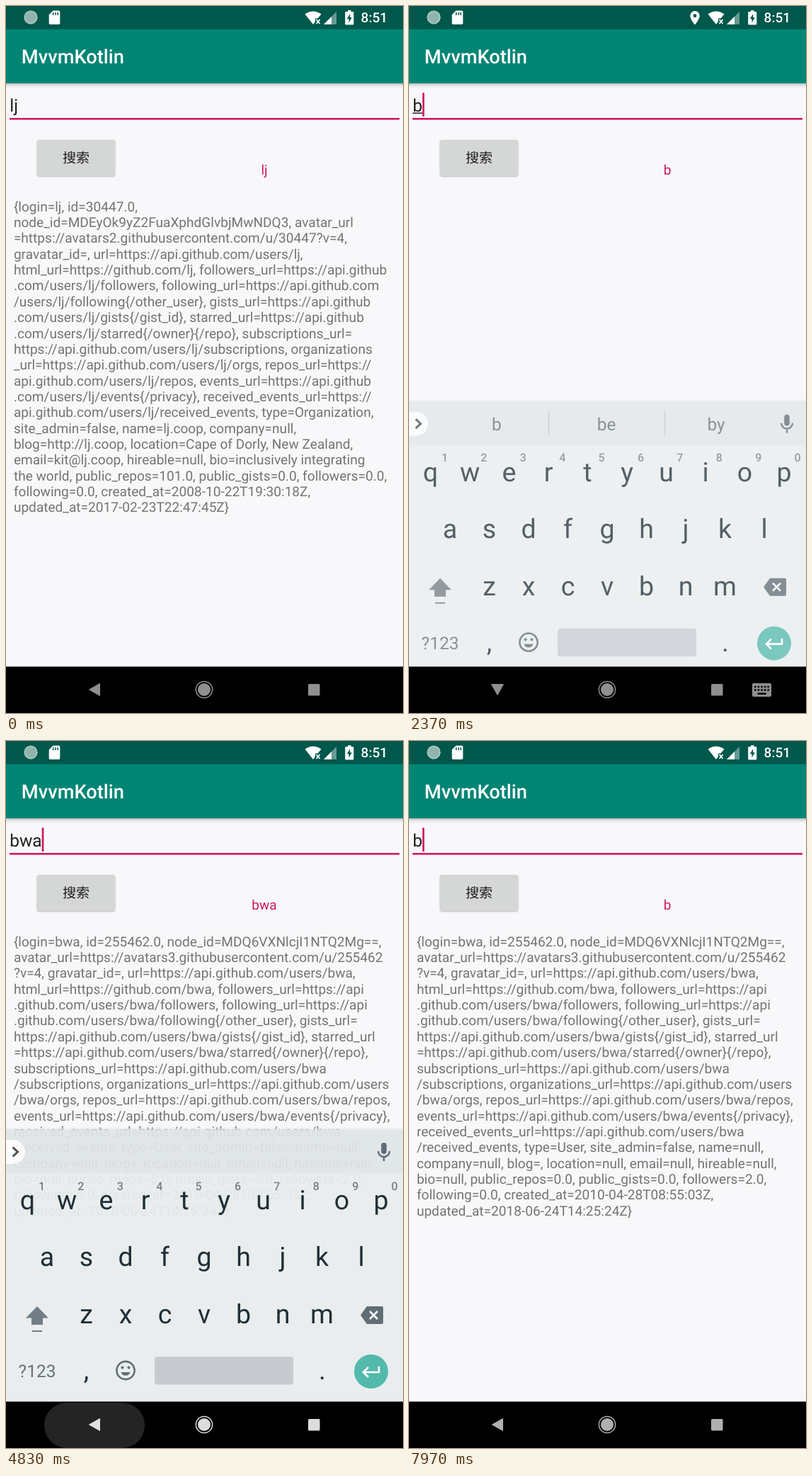
These frames come from a looping animation (561x998 px, 8000 ms). An HTML page:

```html
<!DOCTYPE html>
<html lang="zh">
<head>
<meta charset="utf-8">
<title>MvvmKotlin</title>
<style>
html, body { margin: 0; width: 100%; height: 100%; overflow: hidden; background: #f8f8fa; }
svg { display: block; width: 100vw; height: 100vh; font-family: Roboto, "Noto Sans CJK SC", "Noto Sans CJK", sans-serif; }
text { white-space: pre; text-rendering: geometricPrecision; }
.mid { text-anchor: middle; }
.key { font-size: 37.5px; fill: #13222a; }
.hint { font-size: 16px; font-weight: 500; fill: #70787d; }
.word { font-size: 24.5px; fill: #5d6970; }
.body { font-size: 19.09px; fill: #747474; }
.line { fill: none; stroke-linecap: butt; }
</style>
</head>
<body>
<svg viewBox="0 0 561 998" preserveAspectRatio="none">
  <defs>
    <linearGradient id="shade" x2="0" y2="1">
      <stop offset="0" stop-opacity=".28"/><stop offset=".4" stop-opacity=".09"/><stop offset="1" stop-opacity="0"/>
    </linearGradient>
    <linearGradient id="edge" x2="0" y2="1">
      <stop offset="0" stop-color="#e0e5e7" stop-opacity="0"/><stop offset="1" stop-color="#e0e5e7"/>
    </linearGradient>
    <filter id="lift" x="-10%" y="-15%" width="120%" height="140%">
      <feDropShadow dx="0" dy="1" stdDeviation="1.2" flood-opacity=".35"/>
    </filter>
    <clipPath id="screen"><rect y="32" width="561" height="902"/></clipPath>
  </defs>

  <rect width="561" height="998" fill="#f8f8fa"/>
  <g clip-path="url(#screen)">
    <g id="page">
      <rect y="109.1" width="561" height="7" fill="url(#shade)"/>
      <rect y="30" width="561" height="79.1" fill="#008574"/>
      <text x="21.8" y="81" font-size="27.27" font-weight="500" fill="#fff">MvvmKotlin</text>
      <text id="prompt" x="5" y="148.5" font-size="24.5" fill="#9c9c9e">输入用户名</text>
      <text id="field" x="5.2" y="149" font-size="24.5" fill="#212121"></text>
      <rect id="compose" x="5.2" y="150.5" height="1.5" fill="#212121"/>
      <rect id="caret" y="122.5" width="2.7" height="33.5" fill="#cf1a5d"/>
      <rect x="5" y="158" width="551" height="2.6" fill="#cf1a5d"/>
      <g filter="url(#lift)"><rect x="44" y="189" width="110" height="50.5" rx="2.7" fill="#d5d7d7"/></g>
      <rect id="press" x="44" y="189" width="110" height="50.5" rx="2.7" opacity="0"/>
      <text class="mid" x="99" y="221" font-size="19.09" fill="#1c1c1c">搜索</text>
      <text id="echo" class="mid" x="365" y="238" font-size="19.09" fill="#cf1a5d"></text>
      <g id="first" class="body"></g>
      <g id="second" class="body"></g>
    </g>
    <g id="keys">
      <rect y="543" width="561" height="5" fill="url(#edge)"/>
      <rect y="547" width="561" height="62" fill="#e0e5e7"/>
      <rect y="608" width="561" height="326" fill="#e8edee"/>
      <path d="M0 561H10a17 17 0 0 1 0 34H0Z" fill="#fdfdfd"/>
      <path class="line" d="M9.5 571.5L16.5 578L9.5 584.5" stroke="#3a474e" stroke-width="3"/>
      <g id="words"><path class="line" d="M197.5 561V594M361.5 561V594" stroke="#b9c0c4" stroke-width="1.4"/></g>
      <g fill="#57646c">
        <rect x="530.2" y="565" width="7.6" height="16" rx="3.8"/>
        <path class="line" d="M526 577a8 8 0 0 0 16 0M534 585V591" stroke="#57646c" stroke-width="2.4"/>
        <path d="M501 808.5L510 796H531a2 2 0 0 1 2 2V819a2 2 0 0 1-2 2H510Z"/>
        <path class="line" d="M514 803L525 814M525 803L514 814" stroke="#f2f5f5" stroke-width="2.8"/>
      </g>
      <path d="M44 796L60 812.5H52V822H36V812.5H28ZM37 830H51V832H37Z" fill="#6a767e"/>
      <text class="word mid" x="44" y="896">?123</text>
      <circle class="line" cx="169" cy="886.5" r="12.6" stroke="#57646c" stroke-width="2.6"/>
      <path d="M162.5 889H175.5a6.8 6.8 0 0 1-13 0Z" fill="#57646c"/>
      <circle cx="164.5" cy="882.5" r="2" fill="#57646c"/><circle cx="173.5" cy="882.5" r="2" fill="#57646c"/>
      <rect x="210" y="867" width="196" height="39.5" rx="4" fill="#c4c9ce"/>
      <circle cx="516" cy="888" r="24" fill="#49b5a8"/>
      <path class="line" d="M527 881V889H506M512 882L505 889L512 896" stroke="#fff" stroke-width="2.7"/>
    </g>
  </g>

  <rect width="561" height="32.75" fill="#00574b"/>
  <g fill="#fff">
    <circle cx="35" cy="16" r="9.5" fill="#8fb5ad"/>
    <circle class="line" cx="35" cy="16" r="8.6" stroke="#c3d8d3" stroke-width="1.8" stroke-dasharray="1.4 1.4"/>
    <path d="M66.5 6.5H74.5a1.8 1.8 0 0 1 1.8 1.8V24.2a1.8 1.8 0 0 1-1.8 1.8H62.5a1.8 1.8 0 0 1-1.8-1.8V12.3Z"/>
    <path class="line" d="M66.7 9V13M70 9V13M73.2 9V13" stroke="#00574b" stroke-width="1.5"/>
    <path id="pin" fill-rule="evenodd" d="M404 7a6.7 6.7 0 0 1 6.7 6.7C410.7 18.7 404 26.5 404 26.5S397.3 18.7 397.3 13.7A6.7 6.7 0 0 1 404 7ZM404 11.3a2.4 2.4 0 1 0 .01 0Z"/>
    <path d="M422.5 11.5Q434 3.5 445.5 11.5L440.5 17.5H437V22L434 26Z"/>
    <path class="line" d="M438.5 19L443.5 25M443.5 19L438.5 25" stroke="#fff" stroke-width="1.8"/>
    <path d="M467 8V26H449Z" opacity=".4"/>
    <path d="M460 15V26H449Z"/>
    <path d="M483 6H487.5V8H490a1.3 1.3 0 0 1 1.3 1.3V25.2A1.3 1.3 0 0 1 490 26.5H480.5A1.3 1.3 0 0 1 479.2 25.2V9.3A1.3 1.3 0 0 1 480.5 8H483Z"/>
    <path d="M486.2 11L481.8 18.3H484.5V23.5L488.8 16.2H486.2Z" fill="#00574b"/>
    <text x="501.6" y="23" font-size="19.09" font-weight="500">8:51</text>
  </g>

  <rect y="932.5" width="561" height="65.5" fill="#000"/>
  <rect id="ripple" x="54" y="934" width="142" height="64" rx="32" fill="#242424"/>
  <g id="nav" fill="#fff">
    <path id="back" stroke="#fff" stroke-linejoin="round"/>
    <circle class="line" cx="280" cy="965" r="11.6" stroke="#fff" stroke-width="1.5"/>
    <circle cx="280" cy="965" r="9"/>
    <rect x="427" y="957" width="16.5" height="16.5" rx="1.5"/>
    <g id="ime">
      <rect x="485" y="956" width="27" height="19" rx="2"/>
      <path class="line" d="M488 961H509M488 965.5H509" stroke="#000" stroke-width="2.6" stroke-dasharray="2.6 2"/>
      <path d="M492.5 969.5H504.5V972H492.5Z" fill="#000"/>
    </g>
  </g>
</svg>
<script>
const LOOP = 8000;
const el = Object.fromEntries([...document.querySelectorAll('svg [id]')].map(n => [n.id, n]));

function addText(parent, x, y, str, cls = '') {
  const n = document.createElementNS('http://www.w3.org/2000/svg', 'text');
  set(n, { x, y, class: cls });
  n.textContent = str;
  parent.append(n);
  return n;
}

function set(n, attrs) {
  for (const k in attrs) n.setAttribute(k, attrs[k]);
}

const show = (n, on) => n.setAttribute('visibility', on ? 'visible' : 'hidden');
const ramp = (t, a, b) => Math.min(1, Math.max(0, (t - a) / (b - a)));
const easeOut = p => 1 - (1 - p) ** 3;
// Last value whose start time has passed
const at = (steps, t) => steps.reduce((v, [start, next]) => t >= start ? next : v, steps[0][1]);

const API = 'https://api.github.com/users/';

const firstReply = `{login=lj, id=30447.0,
node_id=MDEyOk9yZ2FuaXphdGlvbjMwNDQ3, avatar_url
=https://avatars2.githubusercontent.com/u/30447?v=4,
gravatar_id=, url=${API}lj,
html_url=https://github.com/lj, followers_url=https://api.github
.com/users/lj/followers, following_url=https://api.github.com
/users/lj/following{/other_user}, gists_url=https://api.github
.com/users/lj/gists{/gist_id}, starred_url=https://api.github
.com/users/lj/starred{/owner}{/repo}, subscriptions_url=
${API}lj/subscriptions, organizations
_url=${API}lj/orgs, repos_url=https://
api.github.com/users/lj/repos, events_url=https://api.github
.com/users/lj/events{/privacy}, received_events_url=https://
api.github.com/users/lj/received_events, type=Organization,
site_admin=false, name=lj.coop, company=null,
blog=http://lj.coop, location=Cape of Dorly, New Zealand,
email=kit@lj.coop, hireable=null, bio=inclusively integrating
the world, public_repos=101.0, public_gists=0.0, followers=0.0,
following=0.0, created_at=2008-10-22T19:30:18Z,
updated_at=2017-02-23T22:47:45Z}`;

const secondReply = `{login=bwa, id=255462.0, node_id=MDQ6VXNlcjI1NTQ2Mg==,
avatar_url=https://avatars3.githubusercontent.com/u/255462
?v=4, gravatar_id=, url=${API}bwa,
html_url=https://github.com/bwa, followers_url=https://api
.github.com/users/bwa/followers, following_url=https://api
.github.com/users/bwa/following{/other_user}, gists_url=
${API}bwa/gists{/gist_id}, starred_url
=${API}bwa/starred{/owner}{/repo},
subscriptions_url=${API}bwa
/subscriptions, organizations_url=https://api.github.com/users
/bwa/orgs, repos_url=${API}bwa/repos,
events_url=${API}bwa/events{/privacy},
received_events_url=${API}bwa
/received_events, type=User, site_admin=false, name=null,
company=null, blog=, location=null, email=null, hireable=null,
bio=null, public_repos=0.0, public_gists=0.0, followers=2.0,
following=0.0, created_at=2010-04-28T08:55:03Z,
updated_at=2018-06-24T14:25:24Z}`;

const addLines = (parent, str) =>
  str.split('\n').forEach((s, i) => addText(parent, 10.9, 289.7 + i * 22.35, s));
addLines(el.first, firstReply);
addLines(el.second, secondReply);

[['q w e r t y u i o p', 30.5, 659], ['a s d f g h j k l', 58, 739], ['z x c v b n m', 113.5, 820]]
  .forEach(([row, x, y]) => row.split(' ').forEach((c, i) => addText(el.keys, x + i * 55.5, y, c, 'key mid')));
for (let i = 0; i < 10; i++) addText(el.keys, 50.5 + i * 55.4, 631.5, (i + 1) % 10, 'hint mid');
addText(el.keys, 113.5, 899, ',', 'key mid');
addText(el.keys, 447, 899, '.', 'key mid');
const words = [124, 279, 434].map(x => addText(el.words, x, 587, '', 'word mid'));

const typed = [[0, 'lj'], [800, ''], [2280, 'b'], [2420, 'bw'], [3300, 'bwa'], [6950, 'bw'], [7150, 'b']];
const offers = [[0, ['b', 'be', 'by']], [2420, ['bw', 'we', 'bwa']], [3300, ['bwa', 'bwas', 'WAB']]];
const caretOn = [[0, false], [1690, true], [5200, false], [6220, true], [6720, false], [6810, true]];
const OPEN = 2290, HIDE = 4815;

function render(t) {
  // The old screen leaves, a fresh one enters
  const leave = ramp(t, 40, 800), enter = easeOut(ramp(t, 850, 1650));
  const fresh = t >= 800;
  set(el.page, {
    opacity: fresh ? enter : 1 - leave,
    transform: `translate(0 ${fresh ? 60 * (1 - enter) : 60 * leave * leave})`
  });

  const str = at(typed, t);
  el.field.textContent = str;
  el.echo.textContent = str;
  const len = str ? el.field.getComputedTextLength() : 0;
  show(el.prompt, !str);
  set(el.caret, { x: 5.2 + len });
  show(el.caret, at(caretOn, t));
  set(el.compose, { width: len });
  show(el.compose, t >= 2280 && t < HIDE);
  show(el.first, t < 800);
  show(el.second, t >= 4700);
  set(el.press, { opacity: 0.11 * Math.min(ramp(t, 3790, 3970), 1 - ramp(t, 4100, 4430)) });
  set(el.pin, { opacity: ramp(t, 1690, 1860) * (1 - ramp(t, 3750, 3850)) });

  const rise = easeOut(ramp(t, OPEN, OPEN + 240)), drop = ramp(t, HIDE, HIDE + 160);
  set(el.keys, {
    opacity: rise * (1 - drop) ** 0.6,
    transform: `translate(0 ${40 * (1 - rise) + 20 * drop})`
  });
  const offer = at(offers, t);
  words.forEach((w, i) => {
    w.textContent = offer[i];
    set(w, { 'font-weight': offer[i] === 'we' ? 700 : 400 });
  });
  show(el.words, t < HIDE);

  const imeOpen = t >= OPEN && t < HIDE;
  set(el.back, { d: imeOpen ? 'M116.5 957.5H133.5L125 972.5Z' : 'M132.5 956.5V973.5L117.5 965Z' });
  show(el.ime, imeOpen);
  set(el.ripple, { opacity: ramp(t, 4700, 4790) * (1 - ramp(t, 4880, 5240)) });
  set(el.nav, { opacity: 0.56 + 0.44 * ramp(t, 4700, 4890) - 0.32 * ramp(t, 6950, 8000) });
}

const start = performance.now();
function tick() {
  render((performance.now() - start) % LOOP);
  requestAnimationFrame(tick);
}
tick();
</script>
</body>
</html>
```
